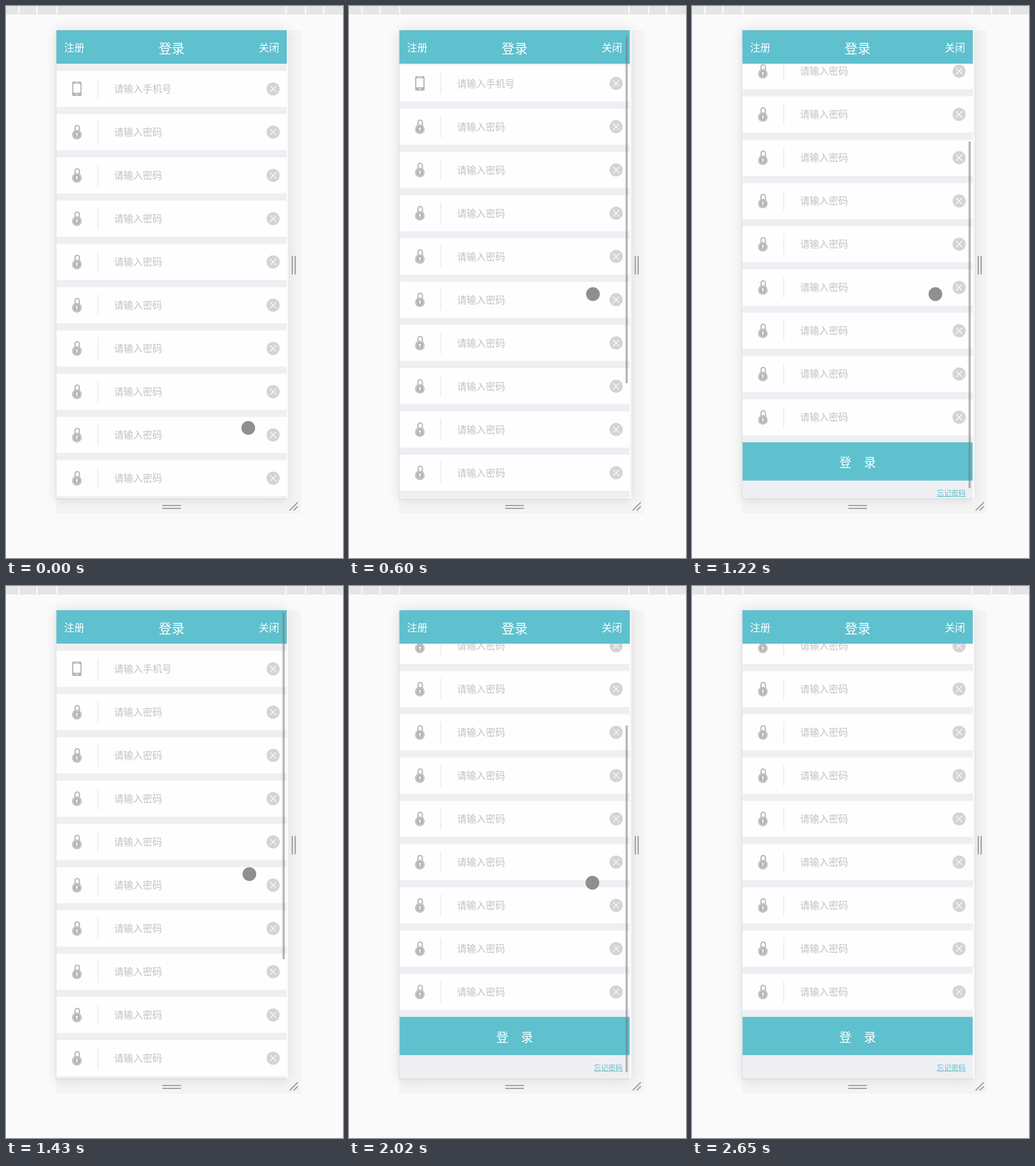
Animation of 585 by 957 pixels, one loop 2.84 s. Source, as an HTML page with a canvas:

```html
<!DOCTYPE html>
<html lang="zh-CN">
<head>
<meta charset="utf-8">
<title>登录</title>
<style>
html, body { margin: 0; width: 100%; height: 100%; overflow: hidden; background: #fafafa; }
canvas { display: block; }
</style>
</head>
<body>
<canvas id="stage" width="585" height="957"></canvas>
<script>
const ctx = document.getElementById('stage').getContext('2d');
const LOOP = 2840;
const TEAL = '#5fc0ce', ICON = '#b4b4b4', WHITE = '#fefefe', GAP = '#eeeff3', HANDLE = '#a0a0a0';
const VIEW = { x: 87.5, y: 42, w: 400, h: 812 };
const HEADER = 58, ROWS = 12, PITCH = 75, MAX_SCROLL = 265;
const THUMB = { top: 46, travel: 196, h: 601 };

// Each step holds until the next one and only lists what changes.
const steps = [
  { at: 0, scroll: 0, bar: 0, dot: [420.5, 731.5] },
  { at: 200, dot: [420.5, 558] },
  { at: 410, dot: [423.5, 499.5] },
  { at: 600, scroll: 9.4, bar: 1 },
  { at: 820, scroll: MAX_SCROLL },
  { at: 1020, dot: [422.5, 499.5] },
  { at: 1220, scroll: 255.6 },
  { at: 1430, scroll: 0 },
  { at: 1830, scroll: 12 },
  { at: 2020, scroll: MAX_SCROLL, dot: [422.5, 514.5] },
  { at: 2220, dot: null },
  { at: 2450, bar: 0.5 },
  { at: 2650, bar: 0 }
];

const stateAt = t => Object.assign({}, ...steps.filter(s => s.at <= t));

function rect(x, y, w, h, color) {
  ctx.fillStyle = color;
  ctx.fillRect(x, y, w, h);
}

function disc(x, y, r, color) {
  ctx.fillStyle = color;
  ctx.beginPath();
  ctx.arc(x, y, r, 0, Math.PI * 2);
  ctx.fill();
}

function line(x1, y1, x2, y2, width, color, cap = 'round') {
  ctx.strokeStyle = color;
  ctx.lineWidth = width;
  ctx.lineCap = cap;
  ctx.beginPath();
  ctx.moveTo(x1, y1);
  ctx.lineTo(x2, y2);
  ctx.stroke();
}

function rounded(x, y, w, h, r, color) {
  ctx.fillStyle = color;
  ctx.beginPath();
  ctx.roundRect(x, y, w, h, r);
  ctx.fill();
}

function text(str, x, cy, size, color, align = 'left') {
  ctx.font = `${size}px "Noto Sans CJK SC", "Noto Sans CJK", sans-serif`;
  ctx.textAlign = align;
  ctx.fillStyle = color;
  ctx.fillText(str, x, cy + size * 0.38);
}

function phoneIcon(x, y) {
  rounded(x - 8.2, y - 12.5, 16.4, 25, 2.5, ICON);
  rect(x - 6.2, y - 8.8, 12.4, 15.6, WHITE);
  line(x - 2.5, y - 10.6, x + 2.5, y - 10.6, 1, WHITE);
  disc(x, y + 9.7, 1.3, WHITE);
}

function lockIcon(x, y) {
  ctx.strokeStyle = ICON;
  ctx.lineWidth = 2;
  ctx.lineCap = 'butt';
  ctx.beginPath();
  ctx.moveTo(x - 3.2, y - 2);
  ctx.lineTo(x - 3.2, y - 7.6);
  ctx.arc(x + 0.6, y - 7.6, 3.8, Math.PI, 0);
  ctx.lineTo(x + 4.4, y - 2);
  ctx.stroke();
  disc(x, y + 4.5, 8.3, ICON);
  ctx.strokeStyle = '#dedede';
  ctx.lineWidth = 0.9;
  ctx.beginPath();
  ctx.arc(x, y + 4.5, 6.6, 0, Math.PI * 2);
  ctx.stroke();
  disc(x, y + 3, 1.6, WHITE);
  line(x, y + 4, x, y + 7.3, 1.5, WHITE);
}

function clearIcon(x, y) {
  disc(x, y, 11.4, '#d4d4d4');
  line(x - 5, y - 5, x + 5, y + 5, 1.3, WHITE);
  line(x - 5, y + 5, x + 5, y - 5, 1.3, WHITE);
}

function row(i, scroll) {
  const y = 143.6 + i * PITCH - scroll;
  if (y < 60 || y > 890) return;
  rect(VIEW.x, y - 31.2, VIEW.w, 62.5, WHITE);
  (i ? lockIcon : phoneIcon)(123, y);
  line(159.4, y - 18.6, 159.4, y + 18.6, 1.1, '#e3e3e3', 'butt');
  text(i ? '请输入密码' : '请输入手机号', 187.4, y, 16.7, '#c2c2c2');
  clearIcon(463.7, y);
}

function content(scroll) {
  ctx.save();
  ctx.beginPath();
  ctx.rect(VIEW.x, VIEW.y, VIEW.w, VIEW.h);
  ctx.clip();
  rect(VIEW.x, VIEW.y, VIEW.w, VIEW.h, GAP);
  for (let i = 0; i < ROWS; i++) row(i, scroll);

  const y = 1012 - scroll;
  rect(VIEW.x, y, VIEW.w, 66.3, TEAL);
  text('登　录', 287.5, y + 34.5, 21.3, '#fff', 'center');
  text('忘记密码', 475, y + 88, 12.5, TEAL, 'right');
  rect(425, y + 93.6, 50, 1, TEAL);
  ctx.restore();
}

function header() {
  rect(VIEW.x, VIEW.y, VIEW.w, HEADER, TEAL);
  text('注册', 100.7, 72, 17.8, '#fff');
  text('登录', 287.5, 73.5, 22.5, '#fff', 'center');
  text('关闭', 474.3, 72, 17.8, '#fff', 'right');
}

function frame() {
  rect(0, 0, 585, 957, '#fafafa');
  rect(0, 0, 585, 14.6, '#e5e5e5');
  for (const x of [22.5, 53.7, 88, 486, 520, 551.3]) rect(x - 1.2, 0, 2.4, 14.6, '#fafafa');

  rect(490, 42, 22, 838, '#f4f4f4');
  rect(87, 854, 425, 26, '#f4f4f4');
  ctx.save();
  ctx.shadowColor = 'rgba(0,0,0,0.12)';
  ctx.shadowBlur = 20;
  rect(87, 42, 400.5, 812.6, '#fafafa');
  ctx.restore();
  rect(487.5, 42, 2.5, 812, '#fbfbfb');
  rect(86.4, 42, 1.1, 813, '#d9d9d9');
  rect(86.4, 854, 401.1, 1, '#d6d6d6');

  for (const x of [497, 502]) line(x, 434, x, 464.5, 2.2, HANDLE);
  for (const y of [866, 871]) line(272.2, y, 302.8, y, 2.2, HANDLE);
  line(493, 874, 506, 861, 2.2, HANDLE);
  line(500, 874, 506, 868, 2.2, HANDLE);
}

function draw(t) {
  const { scroll, bar, dot } = stateAt(t);
  frame();
  content(scroll);
  header();
  if (bar) {
    const y = THUMB.top + scroll / MAX_SCROLL * THUMB.travel;
    rect(480, y, 4, THUMB.h, `rgba(120,120,120,${0.5 * bar})`);
  }
  if (dot) disc(...dot, 11.9, '#8f8f8f');
}

function tick() {
  draw(performance.now() % LOOP);
  requestAnimationFrame(tick);
}
tick();
</script>
</body>
</html>
```
